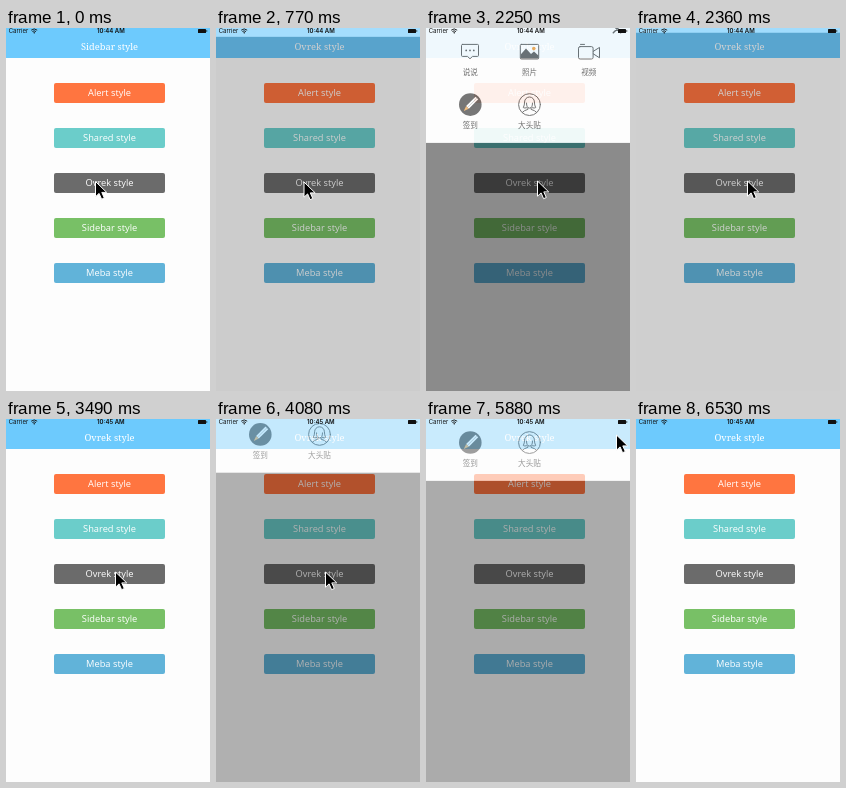
An HTML page for the animation above (8.24 s loop, 204 by 363 pixels).

```html
<!DOCTYPE html>
<html lang="en">
<head>
<meta charset="utf-8">
<title>Popup styles</title>
<style>
  html, body { margin: 0; width: 100%; height: 100%; overflow: hidden; background: #fdfdfd; }
  svg { display: block; width: 100%; height: 100%; }
  text { text-anchor: middle; }
  .title { font: 9.3px "Noto Serif", serif; fill: #fff; }
  .btn { font: 9.3px "Open Sans", sans-serif; fill: #fff; }
  .label { font: 7.6px "Noto Sans CJK SC", "Noto Sans CJK", sans-serif; fill: #606060; }
  .status { font: 6px Inter, sans-serif; fill: #111; }
  .line { fill: none; stroke: #686868; stroke-width: 1; stroke-linejoin: round; stroke-linecap: round; }
</style>
</head>
<body>
<svg viewBox="0 0 204 363" preserveAspectRatio="none">
  <rect width="204" height="363" fill="#fdfdfd"/>
  <rect width="204" height="30" fill="#6dcafd"/>
  <text id="title" class="title" x="103.5" y="22"></text>
  <g id="buttons"></g>

  <g id="popup">
    <rect width="204" height="363" opacity=".5"/>
    <g id="panel">
      <rect width="204" height="135.3" fill="#fefefe"/>
      <path class="line" style="stroke-width:1.5" d="M187.3 17.8l7.4 7.4m0-7.4l-7.4 7.4"/>

      <g transform="translate(44 44)">
        <path class="line" d="M-7.5-7.2h15q1 0 1 1v10q0 1-1 1h-5l-2.5 2.4-2.5-2.4h-5q-1 0-1-1v-10q0-1 1-1z"/>
        <path class="line" style="stroke-width:1.8" d="M-3.8-1.2h0M0-1.2h0M3.8-1.2h0"/>
      </g>
      <g transform="translate(103.5 44)">
        <rect class="line" x="-9.2" y="-7.2" width="18.4" height="14.6" rx="1"/>
        <path fill="#686868" d="M-8.8 7v-4l5.3-6 5 5.5 3-2.7 4.4 4.2v3z"/>
        <circle cx="4.3" cy="-3" r="1.8" fill="#f3a64c"/>
      </g>
      <g transform="translate(163 44)" class="line">
        <rect x="-10.5" y="-5" width="14.6" height="12.4" rx="1.6"/>
        <path d="M4.2-.2l6.3-4v10.4l-6.3-4M-8.5-7.2h4"/>
      </g>
      <g transform="translate(44.3 97)">
        <circle r="11.3" fill="#686868"/>
        <g transform="rotate(45)">
          <path fill="#fff" d="M-1.9-9.3h3.8V4h-3.8z"/>
          <path fill="#f3b873" d="M-1.9 4h3.8L0 9.2z"/>
          <path stroke="#aaa" stroke-width=".6" d="M0-9V4"/>
        </g>
      </g>
      <g transform="translate(103.5 97)" class="line">
        <circle r="10.9"/>
        <path d="M-3 3.2q-2 .6-3.2-.2Q-4.9.5-4.9-2.6a4.9 5 0 0 1 9.8 0Q4.9.5 6.2 3q-1.2.8-3.2.2"/>
        <path d="M-3-1.5q0 5 3 5t3-5M-1.6 3.2v1.6q-4 1-5.6 3M1.6 3.2v1.6q4 1 5.6 3"/>
      </g>
      <text class="label" x="44.3" y="67.6">说说</text>
      <text class="label" x="103.5" y="67.6">照片</text>
      <text class="label" x="162.8" y="67.6">视频</text>
      <text class="label" x="44.3" y="120.4">签到</text>
      <text class="label" x="103.5" y="120.4">大头贴</text>
    </g>
  </g>

  <g class="status">
    <text x="12.5" y="5.4">Carrier</text>
    <text id="clock" x="104.8" y="5.4" font-weight="600"></text>
    <g fill="none" stroke="#111" stroke-width=".9">
      <path d="M25.2 2.2q3-2.6 6 0M26.4 3.6q1.8-1.6 3.6 0"/>
      <circle cx="28.2" cy="4.8" r=".4"/>
    </g>
    <rect x="192" y="1" width="8" height="4" rx=".6"/>
    <rect x="200.4" y="2.2" width=".8" height="1.6"/>
  </g>

  <path id="cursor" d="M0 0V15.2L3.6 11.9 6.1 17.7 8.8 16.5 6.3 10.9H11.2Z" stroke="#fff" stroke-width="1" stroke-linejoin="round"/>
</svg>
<script>
const LOOP = 8240, TRAVEL = 204;
const $ = id => document.getElementById(id);

const buttons = [
  ["Alert", "#ff7540"], ["Shared", "#6bcdca"], ["Ovrek", "#6b6b6b"],
  ["Sidebar", "#78c066"], ["Meba", "#61b3d9"]
];
$("buttons").innerHTML = buttons.map(([name, color], i) => {
  const y = 55 + i * 45;
  return `<rect x="48" y="${y}" width="111" height="20" rx="2" fill="${color}"/>
    <text class="btn" x="103.5" y="${y + 12.8}">${name} style</text>`;
}).join("");

// Popup progress, held between steps: [time, progress]
const popupKeys = [
  [0, 0], [710, .08], [770, .38], [830, .72], [890, 1],
  [2250, .9], [2310, .64], [2360, .36], [2410, 0],
  [3970, .08], [4020, .3], [4080, .6], [4130, 1],
  [5820, .9], [5880, .64], [5940, .34], [6000, 0]
];

// Pointer path: [time, x, y]
const cursorKeys = [
  [0, 89.5, 153.5], [60, 89.5, 153.5], [60, 88, 154], [1430, 88, 154],
  [1430, 93.5, 154], [1630, 104, 154], [1830, 111.5, 153],
  [2470, 111.5, 153], [2890, 109.5, 153], [4310, 109.5, 153],
  [4310, 112, 151], [4550, 140, 105], [4780, 175, 42], [4950, 193, 8],
  [5110, 192, 14], [5170, 191.5, 15], [5230, 190.5, 16], [6360, 190.5, 16],
  [6360, 193, 26], [6470, 200, 92], [6530, 210, 130], [LOOP, 210, 130]
];

const lastKey = (keys, t) => keys.findLastIndex(k => k[0] <= t);

function cursorAt(t) {
  const i = lastKey(cursorKeys, t);
  const [t0, x0, y0] = cursorKeys[i];
  const [t1, x1, y1] = cursorKeys[i + 1];
  const u = (t - t0) / (t1 - t0);
  return [x0 + (x1 - x0) * u, y0 + (y1 - y0) * u];
}

function render(t) {
  $("title").textContent = (t < 540 ? "Sidebar" : "Ovrek") + " style";
  $("clock").textContent = t < 3490 ? "10:44 AM" : "10:45 AM";
  const p = popupKeys[lastKey(popupKeys, t)][1];
  $("popup").setAttribute("opacity", p);
  $("panel").setAttribute("transform", `translate(0 ${(p - 1) * TRAVEL})`);
  $("cursor").setAttribute("transform", `translate(${cursorAt(t)})`);
}

const start = performance.now();
function tick() {
  render((performance.now() - start) % LOOP);
  requestAnimationFrame(tick);
}
tick();
</script>
</body>
</html>
```
